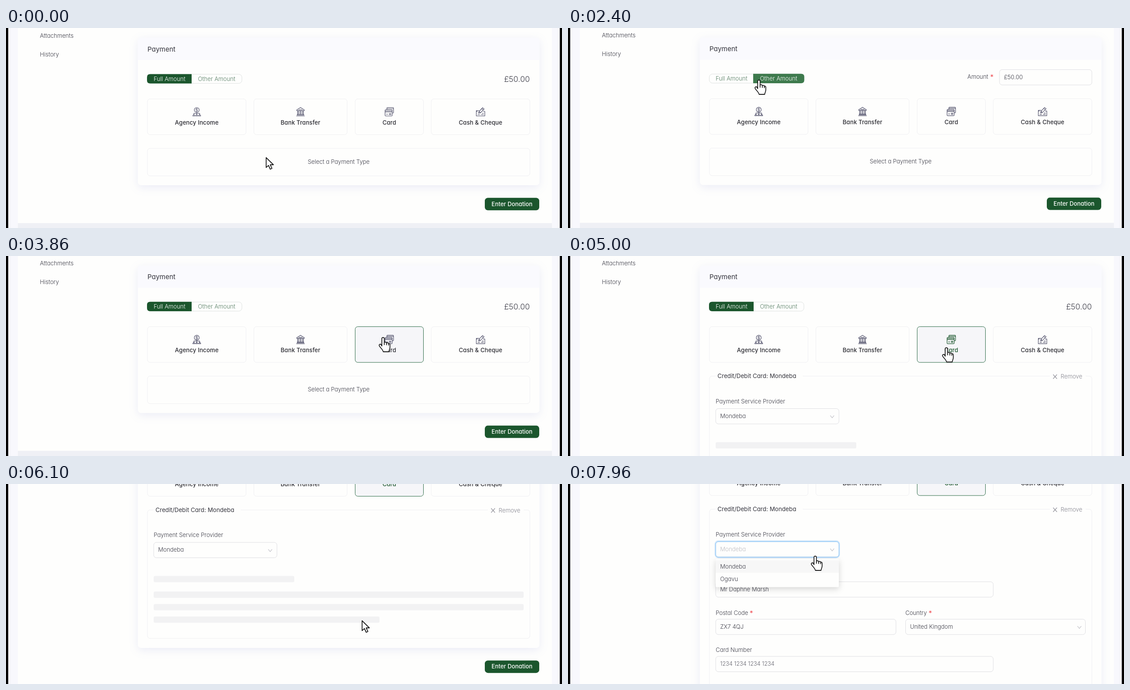
An HTML page that plays this animation: 1246 px wide and 449 px high, repeating every 8000 ms.

```html
<!DOCTYPE html>
<html lang="en">
<head>
<meta charset="utf-8">
<title>Donation payment</title>
<style>
  html, body { margin: 0; width: 100%; height: 100%; overflow: hidden; background: #000; }
  svg { display: block; width: 1246px; height: 449px; }
  text { font: 300 12.9px Inter, "Open Sans", sans-serif; font-feature-settings: "cv11"; fill: #3d3d48; white-space: pre; }
  .head { font-size: 15px; font-weight: 400; fill: #33333c; }
  .name { font-weight: 500; letter-spacing: .15px; fill: #2a2a31; }
  .legend { font-size: 13.2px; font-weight: 400; fill: #33333c; }
  .total { font-size: 17.7px; }
  .btn { font-weight: 500; fill: #fff; }
  .mute { fill: #85858f; }
  .hint { font-size: 12.4px; fill: #5f5f69; }
  .star { font-size: 15px; font-weight: 500; fill: #f0555a; }
  .box { fill: #fefefd; stroke: #efeff2; }
  .field { fill: #fefefd; stroke: #dedee2; }
  .line { fill: none; stroke-width: 1.2; stroke-linejoin: round; stroke-linecap: round; }
  .bar { fill: #f2f2f3; }
  .shadow { filter: drop-shadow(0 5px 10px rgba(70, 80, 190, .1)); }
  .drop { filter: drop-shadow(0 4px 7px rgba(0, 0, 0, .16)); }
  .cursor { fill: #fff; stroke: #1c1c1c; stroke-width: 1.8; stroke-linejoin: round; stroke-linecap: round; }
</style>
</head>
<body>
<svg id="stage" viewBox="0 0 1246 449" xmlns="http://www.w3.org/2000/svg"></svg>
<script>
const LOOP = 8000;
const GREEN = [27, 86, 45], LIGHT = [62, 122, 77], PALE = [88, 127, 101], WHITE = [255, 255, 255];
const PROVIDER = 'Mondeba';
const stage = document.getElementById('stage');

// Markup helpers: y of a text is its visual middle.
const rect = (x, y, w, h, attrs = '', r = 0) => `<rect x="${x}" y="${y}" width="${w}" height="${h}" rx="${r}" ${attrs}/>`;
const text = (x, y, s, cls = '', attrs = '') => `<text x="${x}" y="${y + 4.5}" class="${cls}" ${attrs}>${s}</text>`;
const mid = 'text-anchor="middle"';
const line = (d, attrs = '') => `<path class="line" d="${d}" ${attrs}/>`;
const field = (x, y, w, s, cls = '') => rect(x, y, w, 34.5, 'class="field"', 6) + text(x + 10, y + 17, s, cls);
const label = (x, y, s, starX) => text(x, y, s) + (starX ? text(starX, y + 1, '*', 'star') : '');
const chevron = (x, y) => line(`M${x - 4} ${y - 2.5}l4 5 4-5`, 'stroke="#c2c2c8"');

const cards = [
  { x: 317, w: 221, name: 'Agency Income',
    icon: 'M-5.5-4a5.5 5.5 0 1 0 11 0a5.5 5.5 0 1 0-11 0M1.8-6c-1-1.4-3.6-1-3.6.5 0 2 3.6 1 3.6 3 0 1.6-2.6 2-3.6.5M0-7.7v1M0-1.2v1M0 1.5V6M-6.5 5.5V3.5H6.5V5.5M-9 9.5l2.5-4 2.5 4zM-2.5 9.5L0 5.5l2.5 4zM4 9.5l2.5-4 2.5 4z' },
  { x: 555.5, w: 209, name: 'Bank Transfer',
    icon: 'M-8.5-4L0-9.5 8.5-4V-2.5H-8.5zM-4-4.5H4M-6.5-2.5V6M-4.5-2.5V6M-1.2-2.5V6M1.2-2.5V6M4.5-2.5V6M6.5-2.5V6M-7.5 6H7.5V7.5H-7.5zM-9 9.5H9' },
  { x: 782.5, w: 153, name: 'Card',
    icon: 'M-5.5-4.5V-8q0-1.5 1.5-1.5H8q1.5 0 1.5 1.5V1.5Q9.5 3 8 3H6.5M-5-7H9M-8-4.5H5Q6.5-4.5 6.5-3V8Q6.5 9.5 5 9.5H-8Q-9.5 9.5-9.5 8V-3Q-9.5-4.5-8-4.5zM-9.5-2H6.5M-9.5.3H6.5M-6.5 5.5H-3.5M0 4H3.5V6.5H0z' },
  { x: 953, w: 221, name: 'Cash &amp; Cheque',
    icon: 'M-3.5-2.5H-9.5V9.5H9.5V-1H6M-6 6.5H-2M1.5 6.5H6.5M3.5 3.5H6.5M-4.5 3.5L-3.5-.5 4.5-9 8-6-.5 2.5zM2.5-7L6-4M-3.5-.5L-.5 2.5M-9.5-2.5L-7.5-.5' }
];

const cardMarkup = cards.map((c, i) => {
  const cx = c.x + c.w / 2;
  return `<g id="card${i}">` + rect(c.x, 159.2, c.w, 80.3, 'class="box"', 6) +
    `<g transform="translate(${cx} 188)">${line(c.icon, 'stroke="#50506a"')}</g>` +
    text(cx, 212.5, c.name, 'name', mid) + '</g>';
}).join('');

const skeleton = [[419, 315], [454, 829], [482, 829], [510, 506]]
  .map(([y, w]) => rect(331, y - .4, w, 14, 'class="bar"', 3)).join('');

const form =
  label(331, 419, 'Cardholder Name', 444) + field(331, 433.1, 622, 'Mr Daphne Marsh') +
  label(331, 503, 'Postal Code', 407) + field(331, 517.1, 404, 'ZX7 4QJ') +
  label(756, 503, 'Country', 808) + field(756.5, 517.1, 403, 'United Kingdom') + chevron(1146, 535.5) +
  label(331, 586, 'Card Number') + field(331, 600.6, 622, '1234 1234 1234 1234', 'hint') +
  label(331, 670, 'Expiry Date') + field(331, 684.1, 404, 'MM / YY', 'hint');

const dropdown =
  rect(331, 382, 276, 63, 'class="drop" fill="#fefefd"', 2) +
  rect(331, 385, 276, 28, 'id="option0" fill="#f7f7f7"') +
  rect(331, 413, 276, 28, 'id="option1" fill="#f7f7f7"') +
  text(341, 399, PROVIDER) + text(341, 427, 'Ogavu');

stage.innerHTML =
  rect(0, 0, 1246, 449) + rect(5, 0, 1236, 449, 'fill="#f8f8fd"') + rect(26.5, 0, 1197, 449, 'fill="#fefefd"') +
  '<g id="page">' +
    rect(26.5, 438, 1197, 500, 'id="footer" fill="#eff0f5"') +
    text(76, 17, 'Attachments') + text(76, 59, 'History') +
    rect(295.5, 22, 900, 331, 'id="panel" class="shadow" fill="#fefefd"', 7) +
    '<path d="M295.5 71.5V29q0-7 7-7h886q7 0 7 7V71.5z" fill="#fafafe"/>' +
    text(317, 48, 'Payment', 'head') +
    rect(316.7, 103.9, 212, 20.4, 'fill="none" stroke="#dee2e0"', 7) +
    '<path id="full" d="M416 103.4H323q-7 0-7 7v7.2q0 7 7 7H416z"/>' +
    '<path id="other" d="M415 103.4H522.5q7 0 7 7v7.2q0 7-7 7H415z"/>' +
    text(366.5, 114, 'Full Amount', '', mid + ' id="fullText"') +
    text(472, 114, 'Other Amount', '', mid + ' id="otherText"') +
    text(1174, 116, '£50.00', 'total', 'text-anchor="end" id="total"') +
    '<g id="amount">' + label(895, 110.5, 'Amount', 946) + field(967, 94, 207, '£50.00') + '</g>' +
    cardMarkup +
    '<g id="empty">' + rect(317, 270.2, 857, 61.8, 'class="box"', 6) + text(745.5, 300, 'Select a Payment Type', '', mid) + '</g>' +
    '<g id="details">' +
      rect(317, 270.2, 857, 288.5, 'id="frame" class="box"', 6) +
      rect(330, 268, 196, 5, 'fill="#fefefd"') + rect(1080, 268, 80, 5, 'fill="#fefefd"') +
      text(335, 270.5, 'Credit/Debit Card: ' + PROVIDER, 'legend') +
      line('M1087.5 267l8 9M1095.5 267l-8 9', 'stroke="#85858f"') + text(1104, 271.5, 'Remove', 'mute') +
      label(331, 327, 'Payment Service Provider') +
      rect(330, 341.6, 278, 37, 'id="glow" fill="none" stroke="#cfe6fb" stroke-width="3"', 7) +
      rect(331, 343.1, 276.2, 34.5, 'id="select" class="field"', 6) +
      text(341, 360, PROVIDER, '', 'id="chosen"') + chevron(592, 361.5) +
      `<g id="skeleton">${skeleton}</g><g id="form">${form}</g>` +
    '</g>' +
    '<g id="button">' + rect(1073, 381.2, 122, 28, 'fill="#1b562d"', 7) + text(1134, 395, 'Enter Donation', 'btn', mid) + '</g>' +
    `<g id="dropdown">${dropdown}</g>` +
  '</g>' +
  '<path id="arrow" class="cursor" d="M1 1V23.2L6.3 18.5 10.2 27 14 25.2 10.2 17H17.3z"/>' +
  '<g id="hand" class="cursor">' +
    '<path d="M7.3 20V3.6a2.7 2.7 0 0 1 5.4 0V12q3-2 5 1 3.200-1.200 4.600 1.400 3.200-.6 3.200 3V23c0 4-2 5.500-2.500 10H10.500c-1-4.500-5-7.500-8.500-12.500-2.500-4 1.800-5.500 3.800-3.500z"/>' +
    '<path fill="none" d="M12.700 12v5M17.700 13v4.500M22.300 14.500v3.500"/>' +
  '</g>';

const el = {};
stage.querySelectorAll('[id]').forEach(e => el[e.id] = e);
const set = (id, attrs) => { for (const k in attrs) el[id].setAttribute(k, attrs[k]); };
const show = (id, on) => set(id, { opacity: +on });

const ramp = (t, a, b) => Math.min(1, Math.max(0, (t - a) / (b - a)));
const mix = (a, b, u) => `rgb(${a.map((v, i) => Math.round(v + (b[i] - v) * u))})`;
const inside = (p, x, y, w, h) => p.x >= x && p.x <= x + w && p.y >= y && p.y <= y + h;

// Pointer tip: time, x, y
const path = [
  [0, 582, 290], [470, 582, 290], [600, 455, 200], [830, 455, 200], [1230, 466, 125],
  [2300, 466, 125], [2400, 429, 117], [2520, 406, 116], [2760, 397, 116],
  [3300, 397, 116], [3560, 520, 234], [3760, 690, 212], [3800, 742, 205], [3860, 846, 183],
  [4400, 846, 183], [4560, 849, 206], [5370, 849, 206], [5530, 797, 306],
  [6330, 797, 306], [6860, 572, 148], [7300, 572, 148], [7620, 562, 210], [7900, 560, 184], [7960, 555, 162]
];

function pointer(t) {
  const i = path.findIndex(k => k[0] > t);
  if (i < 0) { const [, x, y] = path[path.length - 1]; return { x, y }; }
  const a = path[i - 1], b = path[i], u = ramp(t, a[0], b[0]);
  return { x: a[1] + (b[1] - a[1]) * u, y: a[2] + (b[2] - a[2]) * u };
}

function scroll(t) {
  if (t < 1660) return 0;
  if (t < 5800) return .6;
  return .6 + 213 * (1 - (1 - ramp(t, 5770, 6160) ** 1.32) ** 3);
}

function paintToggle(id, on, hover) {
  set(id, { opacity: on, fill: mix(GREEN, LIGHT, hover) });
  el[id + 'Text'].style.fill = mix(PALE, WHITE, on);
}

function draw(t) {
  const s = scroll(t), tip = pointer(t), p = { x: tip.x, y: tip.y + s };
  const opened = t >= 5000, loaded = t >= 6360, drop = ramp(t, 7100, 7320);
  set('page', { transform: `translate(0 ${-s})` });

  const other = ramp(t, 1660, 1900) - ramp(t, 2960, 3200);
  paintToggle('full', 1 - other, t < 2960 ? 0 : 1 - ramp(t, 3330, 3600));
  paintToggle('other', other, 1 - ramp(t, 2450, 2740));
  const custom = t >= 1660 && t < 2960;
  show('total', !custom);
  show('amount', custom);

  let over = inside(p, 317, 103, 212, 24);
  cards.forEach((c, i) => {
    const hover = inside(p, c.x, 159, c.w, 81), picked = i === 2 && opened;
    const [box, icon, name] = el['card' + i].children;
    box.style.fill = hover || picked ? '#f6f6f9' : '';
    box.style.stroke = hover || picked ? '#2b6a45' : '';
    icon.firstChild.setAttribute('stroke', picked ? '#1b562d' : '#50506a');
    name.style.fill = picked ? '#1b562d' : '';
    over = over || hover;
  });

  const bottom = !opened ? 353 : loaded ? 800 : 580;
  set('panel', { height: bottom - 22 });
  set('frame', { height: bottom - 291.5 });
  set('button', { transform: `translate(0 ${bottom - 353})` });
  set('footer', { y: bottom + 85 });
  show('empty', !opened);
  show('details', opened);
  show('skeleton', !loaded);
  show('form', loaded && ramp(t, 6330, 6600));

  const onSelect = opened && inside(p, 331, 343, 276, 35);
  const onList = drop > 0 && inside(p, 331, 378, 276, 67);
  over = over || onSelect || onList;
  el.select.style.stroke = drop > 0 || onSelect ? '#74b9f3' : '';
  el.chosen.style.fill = drop > 0 ? '#bdbdc2' : '';
  show('glow', drop);
  const scale = .8 + .2 * drop;
  set('dropdown', { opacity: drop, transform: `translate(0 ${381 * (1 - scale)}) scale(1 ${scale})` });
  const second = onList && p.y > 413;
  show('option0', !second);
  show('option1', second);

  show('arrow', !over);
  show('hand', over);
  set('arrow', { transform: `translate(${tip.x} ${tip.y})` });
  set('hand', { transform: `translate(${tip.x - 11} ${tip.y - 1})` });
}

const start = performance.now();
function tick() {
  draw((performance.now() - start) % LOOP);
  requestAnimationFrame(tick);
}
tick();
</script>
</body>
</html>
```
